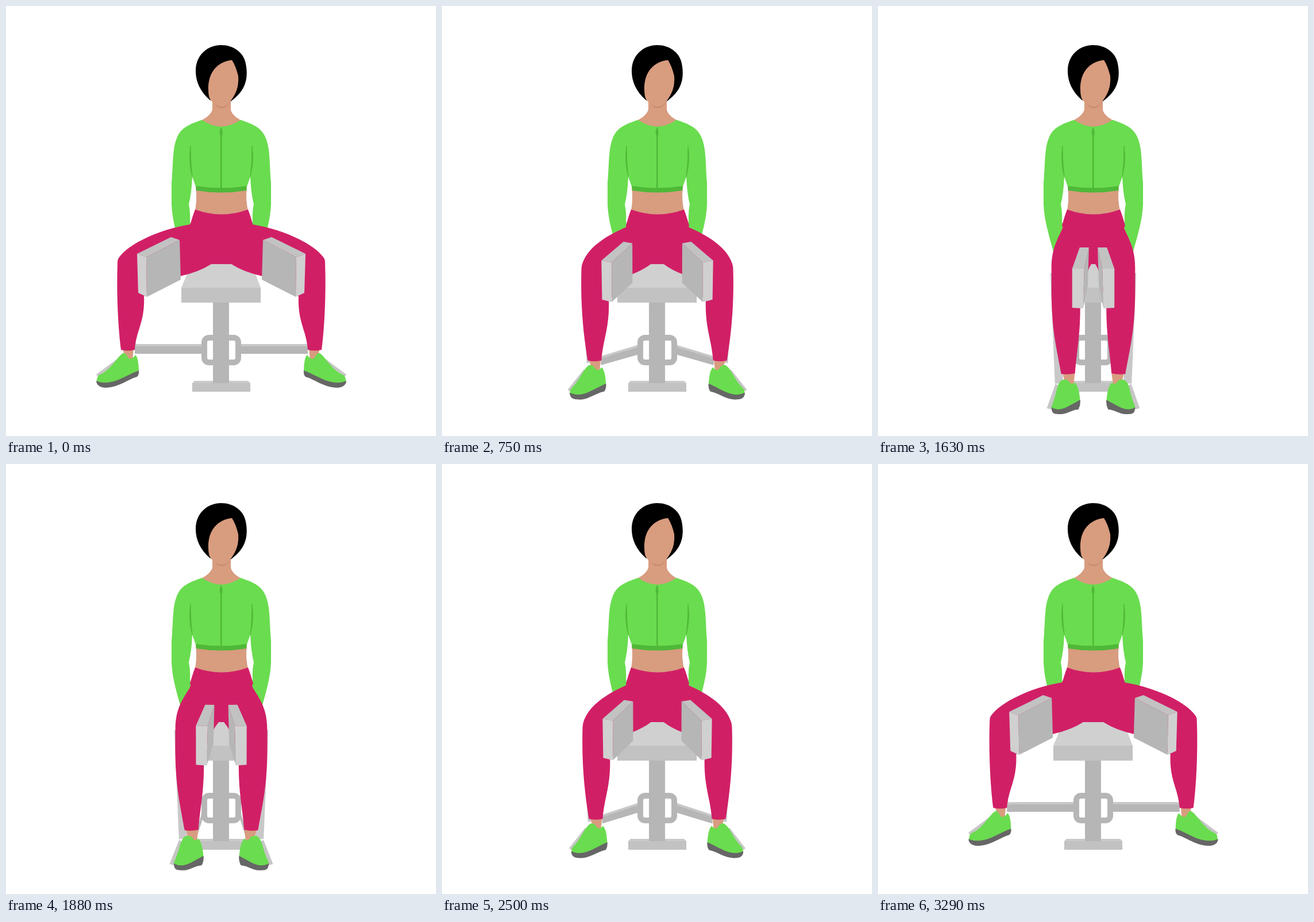
Animation of 748x748 px, one loop 3330 ms. Source, as an HTML page:

```html
<!DOCTYPE html>
<html lang="en">
<head>
<meta charset="utf-8">
<title>Seated hip adduction</title>
<style>
  html, body { margin: 0; width: 100%; height: 100%; overflow: hidden; background: #fff; }
  svg { display: block; width: 100vw; height: 100vh; }
</style>
</head>
<body>
<svg viewBox="0 0 748 748">
  <!-- levers, bars and foot plates -->
  <g id="machine"></g>
  <use href="#machine" transform="matrix(-1 0 0 1 749 0)"/>

  <!-- stand and seat -->
  <rect x="345" y="577" width="59" height="43" rx="8" fill="none" stroke="#b6b6b6" stroke-width="10"/>
  <path fill="#cacaca" d="M324 656L328 652H421L425 656Z"/>
  <path fill="#c2c2c2" d="M324 656H425V671H324Z"/>
  <path fill="#b6b6b6" d="M360 510H388V656H360Z"/>
  <path fill="#d0d0d0" d="M305 490L322 449H427L443 490Z"/>
  <path fill="#c2c2c2" d="M305 490H443V516H305Z"/>

  <!-- torso -->
  <path fill="#d89c7f" d="M330 316Q333 338 328 360Q375 372 422 360Q416 338 419 316Z"/>
  <path fill="#d89c7f" d="M359 160V180Q356 191 338 200Q375 222 411 200Q393 191 391 180V160Z"/>
  <g id="side">
    <path fill="#6adc4f" d="M341 198C318 206 304 212 297 230C289 250 291 275 288 308V345C289 372 297 398 306 430L325 400Q321 380 320 374Q321 358 318 345Q323 325 324 297L330 314Q350 320 376 320V210Q356 209 341 198Z"/>
    <path fill="#4fb838" d="M321 243Q317 270 324 297Q321 270 321 243Z" stroke="#4fb838" stroke-width=".8"/>
  </g>
  <use href="#side" transform="matrix(-1 0 0 1 749 0)"/>
  <path fill="#4fb838" d="M330 313Q375 320 419 313L418 321Q375 328 331 321Z"/>
  <path fill="#4fb838" d="M373 212H375.5V317H373ZM374 210Q379 223 374.500 227Q369 223 374 210Z"/>

  <!-- legs -->
  <g id="leg"></g>
  <use href="#leg" transform="matrix(-1 0 0 1 749 0)"/>
  <path fill="#d11f66" d="M329 354Q375 371 421 354Q425 364 430 382L420 400H330L320 382Q325 364 329 354Z"/>

  <!-- pads -->
  <g id="pad"></g>
  <use href="#pad" transform="matrix(-1 0 0 1 749 0)"/>

  <!-- head -->
  <path d="M355 164C338 149 330 132 330 113C330 84 352 68 374 68C396 68 416 81 418 106C422 135 410 152 391 166Z"/>
  <path fill="#c98d71" d="M360 166Q367 178 375 178Q384 178 391 165Z"/>
  <path fill="#d89c7f" d="M393 94C368 97 351 115 352 146Q352 158 356 164Q366 175 375 175Q384 175 391 165C402 150 405 138 404 122Q400 105 393 94Z"/>
</svg>
<script>
// Each part of the left half: group, fill, outline when open, outline when closed.
const parts = [
  ['machine', '#c8c8c8', 'M198 445L215 445L226 590L206 592Z', 'M300 464L318 470L322 657L308 657Z'],
  ['machine', '#b6b6b6', 'M224 590L346 590L346 605L224 605Z', 'M341 637L346 590L346 605L341 649Z'],
  ['machine', '#c8c8c8', 'M224 588L346 588L346 592L224 592Z', 'M341 635L346 588L346 592L341 639Z'],
  ['machine', '#c6c6c6', 'M157 641L196 612L215 630L161 647Z', 'M294 700L309 657L330 670L303 702Z'],
  ['leg', '#d89c7f', 'M203 595L222 595L220 618L208 616Z', 'M321 637L343 637L340 662L326 658Z'],
  ['leg', '#d11f66',
    'M376 365L330 365L320 380C270 388 215 412 197 437Q194 440 194 447C192 500 195 560 200 598Q212 601 224 598C226 565 242 550 240 505L303 470Q335 463 357 449L376 449Z',
    'M376 365L330 365L319 391C309 412 301 428 302 462Q302 470 302 480C301 560 310 590 319 640Q331 642 343 639C346 600 352 575 352 524L365 462Q367 455 371 449L376 449Z'],
  ['leg', '#6adc4f',
    'M203 604C192 612 182 634 162 642Q157 646 158 655C182 666 210 645 231 638Q231 612 225 607Q219 616 213 613Q208 602 203 604Z',
    'M322 650C311 654 312 672 304 692Q301 697 303 702C318 709 328 700 352 688Q350 660 342 655Q337 660 334 655Q331 649 322 650Z'],
  ['leg', '#666',
    'M157 652C182 663 207 643 231 634Q232 641 228 645C215 648 195 664 173 664C165 664 157 660 157 652Z',
    'M302 698C318 707 328 698 352 685Q353 694 349 702C336 703 328 711 318 710C305 710 303 709 302 698Z'],
  ['pad', '#c2c2c2', 'M228 431L287 402L302 407L244 437Z', 'M338 457L351 420L367 420L359 457Z'],
  ['pad', '#d0d0d0', 'M228 431L244 437L245 506L230 499Z', 'M338 457L359 457L357 526L338 525Z'],
  ['pad', '#b6b6b6', 'M244 437L302 407L304 476L245 506Z', 'M359 457L367 420L365 488L357 526Z']
];

const number = /[\d.]+/g;
const shapes = parts.map(([group, fill, open, closed]) => {
  const path = document.createElementNS('http://www.w3.org/2000/svg', 'path');
  path.setAttribute('fill', fill);
  document.getElementById(group).append(path);
  return { path, open, ends: closed.match(number).map(Number) };
});

const LOOP = 3330, STEP = LOOP / 80;

// Sine ease from 0 to 1 between two times
function ease(t, from, to) {
  const p = Math.min(1, Math.max(0, (t - from) / (to - from)));
  return (1 - Math.cos(Math.PI * p)) / 2;
}

function draw(now) {
  // Steps begin up to 5 ms early, as their times are rounded to 10 ms
  const t = Math.floor((now % LOOP + 5) / STEP) * STEP;
  const u = ease(t, 65, 1530) - ease(t, 1570, 3350);
  for (const { path, open, ends } of shapes) {
    let i = 0;
    path.setAttribute('d', open.replace(number, n => (+n + (ends[i++] - n) * u).toFixed(2)));
  }
}

let start;
function tick(now) {
  start ??= now;
  draw(now - start);
  requestAnimationFrame(tick);
}
draw(0);
requestAnimationFrame(tick);
</script>
</body>
</html>
```
